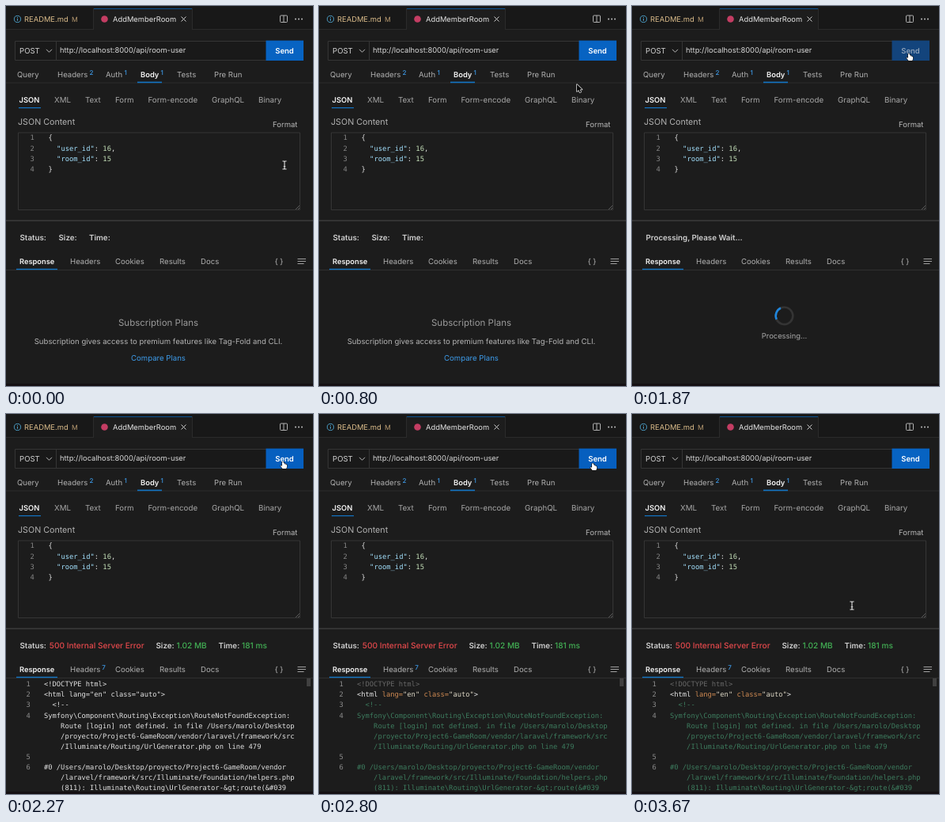
Animation of 388x480 px, one loop 3.74 s. Source, as an HTML page with a canvas:

```html
<!DOCTYPE html>
<html lang="en">
<head>
<meta charset="utf-8">
<title>API client</title>
<style>
html, body { margin: 0; width: 100%; height: 100%; overflow: hidden; background: #1c1c1c; }
canvas { display: block; width: 388px; height: 480px; }
</style>
</head>
<body>
<canvas id="stage"></canvas>
<script>
const W = 388, H = 480, LOOP = 3740, STEP = 200 / 3;
const SENT = 1660, ANSWERED = 2195, HIGHLIGHTED = 2395;
const SANS = 'Inter, sans-serif', MONO = '"DejaVu Sans Mono", monospace';
const TEXT = '#d0d0d0', DIM = '#9a9a9a', BLUE = '#1274c4', LINK = '#3d9be9', LINE = '#353535';

const canvas = document.getElementById('stage');
const ctx = canvas.getContext('2d');
const dpr = window.devicePixelRatio || 1;
canvas.width = W * dpr;
canvas.height = H * dpr;
ctx.textRendering = 'geometricPrecision';

function rect(x, y, w, h, color) {
  ctx.fillStyle = color;
  ctx.fillRect(x, y, w, h);
}

function frame(x, y, w, h, color, radius = 0) {
  ctx.strokeStyle = color;
  ctx.lineWidth = 1;
  ctx.beginPath();
  ctx.roundRect(x, y, w, h, radius);
  ctx.stroke();
}

function lines(color, width, ...paths) {
  ctx.strokeStyle = color;
  ctx.lineWidth = width;
  ctx.beginPath();
  for (const path of paths) {
    path.forEach(([x, y], i) => i ? ctx.lineTo(x, y) : ctx.moveTo(x, y));
  }
  ctx.stroke();
}

function disc(x, y, r, color) {
  ctx.fillStyle = color;
  ctx.beginPath();
  ctx.arc(x, y, r, 0, 7);
  ctx.fill();
}

function text(str, x, y, color = TEXT, size = 9.6, weight = 400, align = 'left') {
  ctx.font = `${weight} ${size}px ${SANS}`;
  ctx.textAlign = align;
  ctx.fillStyle = color;
  ctx.fillText(str, x, y);
}

// Draws [string, color] runs one after another.
function code(runs, x, y, size = 8.77) {
  ctx.font = `${size}px ${MONO}`;
  ctx.textAlign = 'left';
  for (const [str, color] of runs) {
    ctx.fillStyle = color;
    ctx.fillText(str, x, y);
    x += ctx.measureText(str).width;
  }
}

function drawTitleBar() {
  rect(0, 0, W, 29, '#181818');
  rect(0, 29, W, 1, '#2b2b2b');
  rect(111, 3, 124, 27, '#1d1d1d');
  rect(111, 3, 124, 1, '#0d5494');
  rect(110, 3, 1, 26, '#2b2b2b');
  rect(235, 3, 1, 26, '#2b2b2b');

  ctx.strokeStyle = '#4a9cc4';
  ctx.lineWidth = 1;
  ctx.beginPath();
  ctx.arc(14.5, 16.5, 4.1, 0, 7);
  ctx.stroke();
  lines('#4a9cc4', 1, [[14.5, 15.8], [14.5, 18.8]], [[14.5, 14], [14.5, 15]]);
  text('README.md', 23, 20, '#dcbd8b', 9.4);
  text('M', 83, 20, '#b89a70', 8.6);

  disc(124.5, 16.5, 4.3, '#c43d63');
  text('AddMemberRoom', 135, 20, '#e4e4e4', 9.35);
  lines('#d0d0d0', 1, [[221.5, 13.5], [227.5, 19.5]], [[227.5, 13.5], [221.5, 19.5]]);

  frame(346.5, 12, 9, 8.5, '#b0b0b0', 1);
  lines('#b0b0b0', 1, [[351, 12], [351, 20.5]]);
  for (const x of [366, 370, 374]) disc(x, 16.5, 0.9, TEXT);
}

function drawRequest(sending, hover) {
  rect(11, 44, 365, 25, '#191919');
  frame(11.5, 44.5, 364, 24, LINE);
  lines(LINE, 1, [[63.5, 44], [63.5, 69]]);
  text('POST', 17, 60);
  lines('#bbbbbb', 1, [[51, 54.8], [54.5, 58.3], [58, 54.8]]);
  text('http://localhost:8000/api/room-user', 68, 59.3, '#d8d8d8', 9.35);
  rect(328.5, 43.6, 47.5, 25.4, sending ? '#13447c' : hover ? '#065fbf' : '#0763c2');
  text('Send', 352, 60, sending ? '#8ca0b8' : '#ffffff', 9.5, 600, 'center');

  const tabs = [['Query', 14], ['Headers', 65], ['Auth', 126], ['Tests', 216], ['Pre Run', 263]];
  for (const [name, x] of tabs) text(name, x, 89.5, '#b0b0b0');
  text('Body', 170, 89.5, '#f4f4f4', 9.4, 600);
  for (const [count, x] of [['2', 105.5], ['1', 149.5], ['1', 195.5]]) text(count, x, 86.8, LINK, 8, 500);
  rect(0, 96.5, W, 1, '#2d2d2d');
  rect(166, 95.6, 31, 1.6, BLUE);

  const formats = [['XML', 61], ['Text', 100], ['Form', 138], ['Form-encode', 179.5], ['GraphQL', 260], ['Binary', 319]];
  for (const [name, x] of formats) text(name, x, 121.7, '#a8a8a8', 9.75);
  text('JSON', 16.5, 121.7, '#f4f4f4', 9.4, 600);
  rect(16, 128, 28, 1.2, BLUE);

  text('JSON Content', 15, 150, '#b2b2b2', 10.7);
  text('Format', 337, 153, '#b8b8b8', 9.5);
}

function drawEditor() {
  const punct = '#e2e2e2', key = '#a4e2ff', num = '#c4dfb8';
  frame(15.5, 160, 356, 97.5, LINE);
  const rows = [
    [['{', punct]],
    [['  "user_id"', key], [': ', punct], ['16', num], [',', punct]],
    [['  "room_id"', key], [': ', punct], ['15', num]],
    [['}', punct]]
  ];
  rows.forEach((runs, i) => {
    const y = 169.4 + i * 13.1;
    code([[String(i + 1), '#858585']], 30.5, y);
    code(runs, 53.5, y, 8.8);
  });
  lines('#707070', 0.8, [[366, 257], [371, 252]], [[369, 257], [371, 255]]);
}

function drawStatus(t) {
  rect(0, 270.5, W, 1.2, '#444444');
  const y = 296.3;
  if (t >= SENT && t < ANSWERED) {
    text('Processing, Please Wait...', 17.5, y, TEXT, 9.75, 600);
    return;
  }
  const done = t >= ANSWERED;
  text('Status:', 17.5, y, TEXT, 9.8, 600);
  text('Size:', done ? 189.5 : 66.5, y, TEXT, 9.8, 600);
  text('Time:', done ? 268.5 : 105, y, TEXT, 9.8, 600);
  if (!done) return;
  text('500 Internal Server Error', 54.8, y, '#e5494c', 10.15, 500);
  text('1.02 MB', 215.5, y, '#43b255', 10.1, 500);
  text('181 ms', 298, y, '#43b255', 10.1, 500);
}

function drawResponseTabs(done) {
  rect(0, 333, W, 1, '#2f2f2f');
  rect(13, 331.8, 52, 1.4, BLUE);
  text('Response', 17, 325.6, '#f4f4f4', 9.3, 600);
  for (const [name, x] of [['Headers', 81], ['Cookies', 138], ['Results', 194], ['Docs', 246]]) {
    text(name, x, 325.6, '#b0b0b0');
  }
  if (done) text('7', 121.3, 323.3, LINK, 8, 500);
  text('{ }', 345, 325.6, '#b8b8b8', 9.4, 400, 'center');
  for (const y of [319, 322, 325]) rect(368.5, y, y === 325 ? 8 : 10.5, 1, '#a0a0a0');
}

function drawPlans() {
  text('Subscription Plans', 192.5, 403.5, DIM, 11.5, 400, 'center');
  text('Subscription gives access to premium features like Tag-Fold and CLI.', 192.5, 427, '#b4b4b4', 9.6, 400, 'center');
  text('Compare Plans', 192.5, 447.5, LINK, 9.6, 400, 'center');
}

function drawSpinner(t) {
  const mid = (200 + (t - 1867) * 360 / 1100) * Math.PI / 180;
  ctx.lineWidth = 2.6;
  for (const [half, color] of [[Math.PI, '#343434'], [Math.PI / 4, '#1f86dc']]) {
    ctx.strokeStyle = color;
    ctx.beginPath();
    ctx.arc(192.5, 391.3, 10.8, mid - half, mid + half);
    ctx.stroke();
  }
  text('Processing...', 192.5, 419.5, '#a8a8a8', 9.4, 400, 'center');
}

const RESPONSE = [
  ['1', '<!DOCTYPE html>'],
  ['2', '<html lang="en" class="auto">'],
  ['3', '  <!--'],
  ['4', 'Symfony\\Component\\Routing\\Exception\\RouteNotFoundException:'],
  ['', '    Route [login] not defined. in file /Users/marolo/Desktop'],
  ['', '    /proyecto/Project6-GameRoom/vendor/laravel/framework/src'],
  ['', '    /Illuminate/Routing/UrlGenerator.php on line 479'],
  ['5', ''],
  ['6', '#0 /Users/marolo/Desktop/proyecto/Project6-GameRoom/vendor'],
  ['', '    /laravel/framework/src/Illuminate/Foundation/helpers.php'],
  ['', '    (811): Illuminate\\Routing\\UrlGenerator-&gt;route(&#039']
];

function highlight(line, i) {
  if (i === 0) return [[line, '#686868']];
  if (i > 1) return [[line, '#3d7c5e']];
  const tag = '#e6e6e6', attr = '#cf8a52', value = '#dcd6c4';
  return [['<html', tag], [' lang=', attr], ['"en"', value], [' class=', attr], ['"auto"', value], ['>', tag]];
}

function drawResponse(colored) {
  RESPONSE.forEach(([number, line], i) => {
    const y = 344.2 + i * 13.1;
    code([[number, '#8c8c8c']], 25.5, y);
    code(colored ? highlight(line, i) : [[line, '#e2e2e2']], 48, y);
  });
  rect(380, 334, 5, 10, '#404040');
}

// Pointer stops: time, x, y of the hot spot.
const PATH = [
  [0, 352, 201], [130, 351, 199], [560, 293, 127], [800, 326, 99], [1067, 351, 60],
  [1600, 351, 60], [1867, 350, 60], [2667, 350, 60], [2800, 346, 62],
  [3200, 295, 108], [3600, 278, 242], [LOOP, 278, 242]
];

function pointerAt(t) {
  const i = PATH.findIndex((p, n) => n && t <= p[0]);
  const [t0, x0, y0] = PATH[i - 1], [t1, x1, y1] = PATH[i];
  const u = (t - t0) / (t1 - t0), e = u * u * (3 - 2 * u);
  return [x0 + (x1 - x0) * e, y0 + (y1 - y0) * e];
}

const inside = (x, y, l, t, r, b) => x >= l && x <= r && y >= t && y <= b;
const ARROW = new Path2D('M0 0V9L2.1 7.1L3.5 10.2L5.1 9.5L3.8 6.5H6.6Z');
const HAND = new Path2D('M-1 .8Q0-.3 .9 .8L1.1 3.3Q2 .2 2.6 3.7Q3.6 2.8 4.1 4.2Q5 3.8 5.1 5.2V6.5Q4.9 7.7 4.2 9H-.4Q-1.2 7.9-2.7 6.2Q-3.3 5-2 5L-1 5.9Z');

function drawPointer(x, y, hover) {
  ctx.save();
  ctx.translate(x, y);
  ctx.lineJoin = 'round';
  if (inside(x, y, 15, 160, 372, 258)) {
    const beam = [
      [[-2.6, -5], [-0.8, -5], [0, -4.3], [0.8, -5], [2.6, -5]],
      [[0, -4.3], [0, 4.3]],
      [[-2.6, 5], [-0.8, 5], [0, 4.3], [0.8, 5], [2.6, 5]],
      [[-1.3, 1.8], [1.3, 1.8]]
    ];
    lines('#101010', 2.2, ...beam);
    lines('#e8e8e8', 1.1, ...beam);
  } else {
    const shape = hover ? HAND : ARROW;
    ctx.lineWidth = hover ? 1.2 : 1.4;
    ctx.strokeStyle = hover ? '#111111' : '#eeeeee';
    ctx.fillStyle = hover ? '#ffffff' : '#080808';
    ctx.stroke(shape);
    ctx.fill(shape);
  }
  ctx.restore();
}

function draw(t) {
  const sending = t >= SENT && t < ANSWERED, done = t >= ANSWERED;
  const [x, y] = pointerAt(t);
  const hover = inside(x, y, 328, 44, 376, 69);
  ctx.setTransform(dpr, 0, 0, dpr, 0, 0);
  rect(0, 0, W, H, '#1c1c1c');
  drawTitleBar();
  drawRequest(sending, hover);
  drawEditor();
  drawStatus(t);
  drawResponseTabs(done);
  if (done) drawResponse(t >= HIGHLIGHTED);
  else if (sending) drawSpinner(t);
  else drawPlans();
  rect(0, 477, W, 3, '#151013');
  drawPointer(x, y, hover);
}

const start = performance.now();
function tick() {
  const t = (performance.now() - start) % LOOP;
  draw(Math.min(55, Math.floor((t + 4) / STEP)) * STEP);
  requestAnimationFrame(tick);
}
tick();
</script>
</body>
</html>
```
